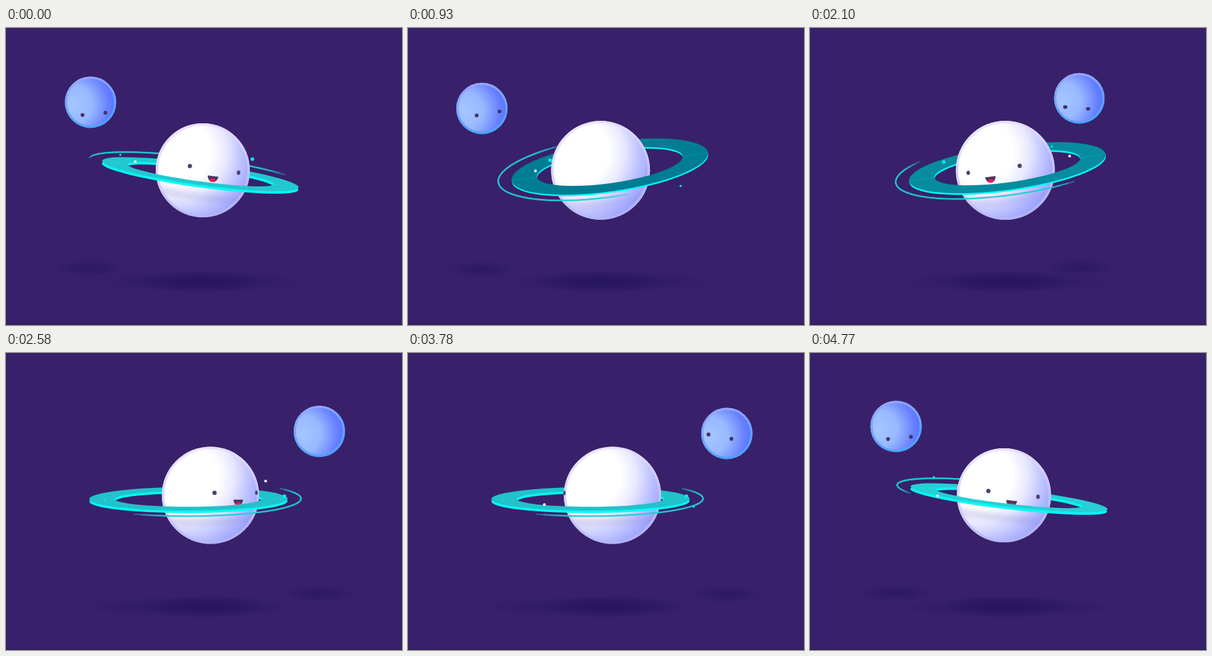
Recreate the animation shown at these times as an HTML page with a canvas. Size 640 px wide and 480 px high, loop 4.8 s.

```html
<!DOCTYPE html>
<html lang="en">
<head>
<meta charset="utf-8">
<title>Ringed planet and moon</title>
<style>
html, body { margin: 0; width: 100%; height: 100%; overflow: hidden; background: #38216a; }
canvas { display: block; }
</style>
</head>
<body>
<canvas id="stage" width="640" height="480"></canvas>
<script>
const ctx = document.getElementById('stage').getContext('2d');
const { sin, cos, exp, abs, min, max, PI } = Math;
const TAU = 2 * PI, RAD = PI / 180;
const LOOP = 4800, STEP = 30, HALF = 2400, SPIN = 600;

const bell = (t, center, width) => exp(-(((t - center) / width) ** 2));
const wave = (p, base, c1, s1, c2, s2) =>
  base + c1 * cos(p) + s1 * sin(p) + c2 * cos(2 * p) + s2 * sin(2 * p);

function oval(x, y, rx, ry, fill) {
  ctx.beginPath();
  ctx.ellipse(x, y, rx, ry, 0, 0, TAU);
  ctx.fillStyle = fill;
  ctx.fill();
}

function at(x, y, angle, draw) {
  ctx.save();
  ctx.translate(x, y);
  ctx.rotate(angle);
  draw();
  ctx.restore();
}

function gradient(g, stops) {
  stops.forEach(([offset, color]) => g.addColorStop(offset, color));
  return g;
}

function shadow(x, y, rx, ry, alpha) {
  at(x, y, 0, () => {
    ctx.scale(rx, ry);
    oval(0, 0, 1, 1, gradient(ctx.createRadialGradient(0, 0, 0, 0, 0, 1), [
      [0, `rgba(34,18,94,${alpha})`], [.5, `rgba(34,18,94,${alpha * .6})`], [1, 'rgba(34,18,94,0)']]));
  });
}

function rim(r, width, top, bottom) {
  ctx.beginPath();
  ctx.arc(0, 0, r - width / 2, 0, TAU);
  ctx.lineWidth = width;
  ctx.strokeStyle = gradient(ctx.createLinearGradient(-r / 3, -r, r / 3, r), [[0, top], [1, bottom]]);
  ctx.stroke();
}

// The moon darts behind the planet, then settles; the way back mirrors the way out.
function moonState(t) {
  const q = (t - 1650 + LOOP) % LOOP, k = q % HALF;
  const progress = 1 - 1 / (1 + (k / 294) ** 3.216);
  const across = q < HALF ? progress : 1 - progress;
  return {
    k, x: 118 + 398 * across,
    y: 130 + 17 * bell(k, 200, 110) - 17 * bell(k, 510, 330),
    r: 41.5 - 6.5 * bell(k, 270, 120),
    side: 2 * across - 1
  };
}

function drawMoon({ k, x, y, r, side }) {
  at(x, y, 0, () => {
    oval(0, 0, r, r, gradient(ctx.createRadialGradient(-28, 4, 0, -28, 4, 72), [
      [0, '#a4c6ff'], [.42, '#98b9ff'], [.8, '#667fff'], [1, '#5570ff']]));
    rim(r, 3.5, '#9aa5f8', '#45a2ff');
    const blinking = abs(k - 930) < 60;
    if (blinking) return;
    const nod = cos((k - 850) / HALF * TAU), down = 12 + 7 * nod, aside = 8.6 - 2.6 * nod;
    const lean = 4.1 - down * .11, rush = bell(k, 250, 140);
    for (const s of [-1, 1])
      oval(s * 18.5 - side * aside, down + s * side * lean, 3.1 + 3 * rush, 3.1 - 1.2 * rush, '#453468');
  });
}

function drawPlanet(t, x, r, tilt, ring) {
  at(x, 230, 0, () => {
    oval(0, 0, r, r, gradient(ctx.createRadialGradient(-38, -30, 0, -38, -30, 122), [
      [0, '#fff'], [.42, '#fff'], [.62, '#e9e9ff'], [.82, '#bfc3ff'], [1, '#9ea5ff']]));
  });
  ctx.save();
  ctx.beginPath();
  ctx.arc(x, 230, r, 0, TAU);
  ctx.clip();
  at(ring.x, ring.y, tilt, () => {
    ctx.filter = 'blur(5px)';
    ctx.strokeStyle = `rgba(135,130,195,${.3 - .12 * ring.open})`;
    ctx.lineWidth = 9;
    ctx.beginPath();
    ctx.ellipse(0, 19, 150, ring.b, 0, 0, PI);
    ctx.stroke();
  });
  ctx.restore();

  at(x, 230, 0, () => rim(r, 4, 'rgba(237,226,252,.9)', 'rgba(177,177,244,.9)'));
  at(x, 230, tilt, () => {
    const turn = t % HALF / HALF * 360;
    const face = turn + 25 - 17 * cos((turn - 60) * RAD);
    const place = (offset, draw) => {
      const a = (face + offset) * RAD, depth = cos(a);
      if (depth > 0) at(r * sin(a), 0, 0, () => draw(depth));
    };
    for (const offset of [-33, 33])
      place(offset, depth => oval(0, -4, 1.5 + 2 * depth, 3.5, '#4b416f'));
    place(-3, depth => {
      ctx.scale(.25 + .75 * depth, 1);
      ctx.beginPath();
      ctx.moveTo(-9, 7);
      ctx.lineTo(9, 7);
      ctx.bezierCurveTo(7, 20, -7, 20, -9, 7);
      ctx.fillStyle = '#4a3765';
      ctx.fill();
      ctx.clip();
      oval(0, 16, 6.5, 5, '#fb1555');
    });
  });
}

function drawRing(ring, tilt, front) {
  at(ring.x, ring.y, tilt, () => {
    // The halves overlap by a pixel so that no seam shows.
    ctx.beginPath();
    ctx.rect(-300, front ? 0 : -200, 600, 201);
    ctx.clip();
    const band = (dy, color) => {
      ctx.beginPath();
      ctx.ellipse(0, dy, 160.2, ring.b, 0, 0, TAU);
      ctx.closePath();
      ctx.moveTo(119, dy);
      ctx.ellipse(0, dy, 119, ring.b * .67, 0, 0, TAU);
      ctx.fillStyle = color;
      ctx.fill('evenodd');
    };
    const { open } = ring;
    band(4.2 - open * 1.8, '#04faf5');
    band(0, `rgb(${39 - 39 * open},${207 - 82 * open},${213 - 66 * open})`);

    // Overlapping strokes soften both ends of the outer arc.
    ctx.strokeStyle = 'rgba(34,205,212,.4)';
    ctx.lineWidth = 2.4;
    for (let i = 0; i < 5; i++) {
      ctx.beginPath();
      ctx.ellipse(0, 0, 182, ring.b + 9, 0,
        (ring.arcStart + i * 4) * RAD, (ring.arcStart + ring.arcSpan - i * 4) * RAD);
      ctx.stroke();
    }
  });
}

// Turns are whole per loop; sway makes an orbit hurry and linger.
const pebbles = [
  { rx: 130, ry: 24, y: 231, phase: -53, turns: 4, sway: 0, size: 2.9, color: '#10e5f3' },
  { rx: 165, ry: 40, y: 228, phase: -145, turns: -2, sway: 50, size: 1.7, color: '#10e5f3' },
  { rx: 115, ry: 38, y: 226, phase: 195, turns: 10, sway: 0, size: 2.2, color: '#fff' }
];

function drawPebbles(t, front) {
  for (const { rx, ry, y, phase, turns, sway, size, color } of pebbles) {
    const a = phase * RAD + turns * TAU * t / LOOP - sway * RAD * sin(t / HALF * TAU);
    if (sin(a) > 0 === front) oval(320 + rx * cos(a), y + ry * sin(a), size, size, color);
  }
}

function render(t) {
  const p = t % SPIN / SPIN * TAU;
  const x = 316.9 + 14.7 * sin(p + .08), r = 78 - 2 * cos(p);
  const tilt = 8.1 * cos(p - .3) * RAD;
  const b = wave(p, 24.9, -9.1, -3.6, 1.5, 6.9);
  const ring = {
    b,
    x: 316.6 - 23.7 * sin(p + .1),
    y: 231 + 8.5 * cos(p - .9),
    open: min(1, max(0, (b - 15) / 25)),
    arcStart: p / RAD + wave(p, 211, -26, 9, -2, 22),
    arcSpan: 150 - 15 * cos(p)
  };
  const moon = moonState(t);

  ctx.fillStyle = '#38216a';
  ctx.fillRect(0, 0, 640, 480);
  ctx.fillStyle = '#2d1b55';
  ctx.fillRect(0, 478.5, 640, 1.5);
  shadow(ring.x, 410, 185, 17, .5);
  shadow(x, 410, 105, 20, .6);
  shadow(moon.x, 390 + (moon.y - 130) * .2, 60, 14, .55);

  drawMoon(moon);
  drawRing(ring, tilt, false);
  drawPebbles(t, false);
  drawPlanet(t, x, r, tilt, ring);
  drawRing(ring, tilt, true);
  drawPebbles(t, true);
}

const start = performance.now();
function tick() {
  const t = (performance.now() - start) % LOOP;
  render(Math.floor(t / STEP) * STEP);
  requestAnimationFrame(tick);
}
tick();
</script>
</body>
</html>
```
